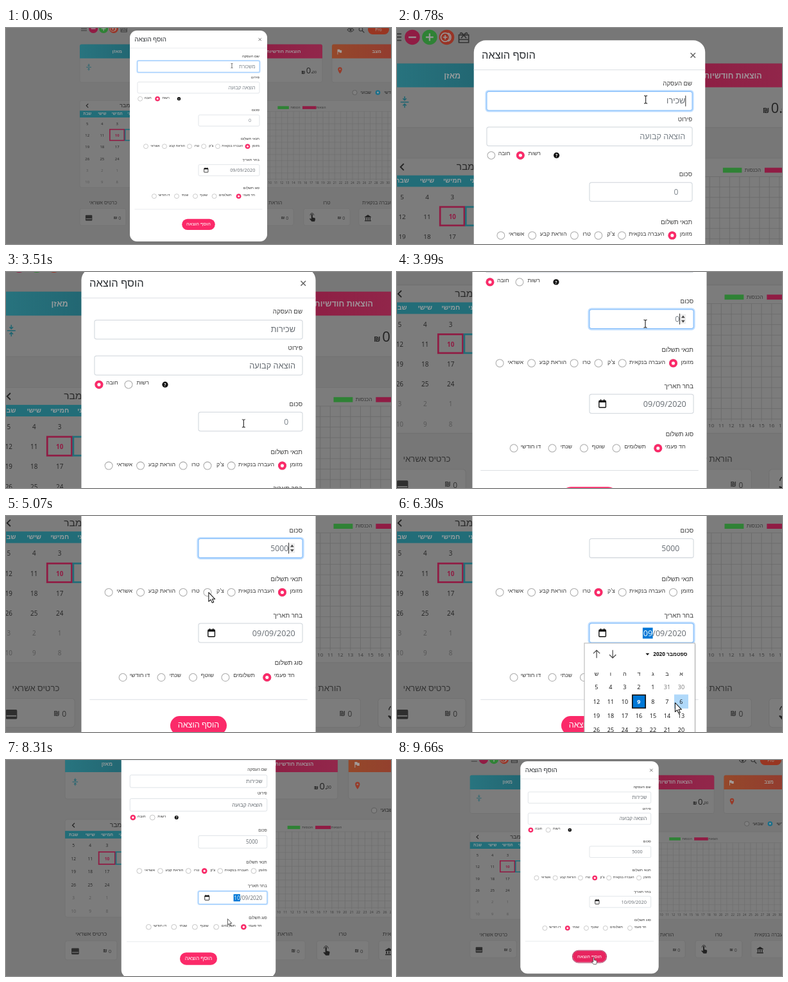
Animation of 600 by 338 pixels, one loop 9690 ms. Source, as an HTML page:

```html
<!DOCTYPE html>
<html lang="he">
<head>
<meta charset="utf-8">
<title>הוסף הוצאה</title>
<style>
html, body { margin: 0; width: 100%; height: 100%; overflow: hidden; background: #777; }
svg { display: block; width: 100vw; height: 100vh; }
text { font-family: 'Open Sans', 'Noto Sans', 'Liberation Sans', sans-serif; white-space: pre; }
</style>
</head>
<body>
<svg id="stage" viewBox="0 0 600 338" preserveAspectRatio="none"></svg>
<script>
const LOOP = 9690;
const PINK = '#fb2a69', DIM_PINK = '#901c44', DIM_GREEN = '#2f8235', TEAL = '#226d78';
const INK = '#3a3a3a', GREY = '#666c72', PALE = '#7b838a';
const stage = document.getElementById('stage');
const $ = id => document.getElementById(id);

// ---- markup helpers (y of a text is its visual middle) ----
const attrs = o => Object.entries(o).map(([k, v]) => ` ${k}="${v}"`).join('');
const tag = (name, o, inner = '') => `<${name}${attrs(o)}>${inner}</${name}>`;
const rect = (x, y, width, height, fill, o = {}) => tag('rect', { x, y, width, height, fill, ...o });
const circle = (cx, cy, r, fill, o = {}) => tag('circle', { cx, cy, r, fill, ...o });
const path = (d, stroke, w = 1, o = {}) => tag('path', { d, fill: 'none', stroke, 'stroke-width': w, ...o });
const text = (x, y, s, size, fill = INK, anchor = 'end', o = {}) =>
  tag('text', { x, y: (y + size * (/\d/.test(s) ? .36 : .29)).toFixed(2), 'font-size': size, fill, 'text-anchor': anchor, ...o }, s);
const group = (id, inner, o = {}) => tag('g', { id, ...o }, inner);
const bold = { 'font-weight': 700 }, semi = { 'font-weight': 600 }, medium = { 'font-weight': 500 };

// ---- dimmed page behind the dialog ----
function card(x, y, w, h) {
  return rect(x, y, w, h, '#7c7c7c', { rx: 3, stroke: '#717171', 'stroke-width': .6 });
}
function topCard(x, w, fill) {
  return card(x, 25.5, w, 59.5) + tag('path', { d: `M${x} 47.6v-19.3q0-2.8 2.8-2.8h${w - 5.6}q2.8 0 2.8 2.8v19.3z`, fill });
}
function gradient(id, a, b) {
  return tag('linearGradient', { id }, `<stop stop-color="${a}"/><stop offset="1" stop-color="${b}"/>`);
}
function page() {
  let s = tag('defs', {}, gradient('teal', '#28747f', '#1f5f6b') + gradient('pink', '#8c1c42', '#92274b') + gradient('orange', '#94482a', '#923831'));
  s += rect(-200, -200, 1000, 800, '#777');
  // toolbar
  s += path('M117 -2h9M117 1h9M117 4h9', '#3a3a3a', 1.1);
  s += circle(136.1, 1.1, 7, DIM_PINK) + path('M132.6 1.1h7', '#999', 1.3);
  s += circle(152.1, 1.1, 7, DIM_GREEN) + path('M148.6 1.1h7M152.1 -2.4v7', '#999', 1.3);
  s += circle(167.9, 1.1, 7, '#983426') + circle(166.5, 1.1, 4, 'none', { stroke: '#999', 'stroke-width': .9 }) +
    path('M169 -2.7a4 4 0 0 1 0 7.6M164.5 1.1h4M166.5 -.9v4', '#999', .9);
  s += path('M179.2 -1h9v7h-9zM179.2 3.2h9M183.7 -1l-2.4 3M183.7 -1l2.4 3M183.7 -1q-3-3.5-3.4-.8M183.7 -1q3-3.5 3.4-.8', '#333', 1);
  s += path('M532 3q5-6 10 0q-5 6-10 0z', '#333', 1) + circle(537, 3, 1.7, '#333');
  s += circle(553, 2, 2.8, 'none', { stroke: '#333', 'stroke-width': 1 }) + path('M555 4l3.4 3.4', '#333', 1.2);
  s += rect(564, -5, 33, 15, '#983622', { rx: 7.5 }) + text(580.5, 2.6, 'Pro', 6.6, '#a0a0a0', 'middle');
  // summary cards
  s += topCard(115, 125, 'url(#teal)') + topCard(368, 125, 'url(#pink)') + topCard(508, 125, 'url(#orange)');
  s += text(180.8, 37, 'מאזן', 7.4, '#959b9c', 'end', bold) + text(459.5, 37, 'הוצאות חודשיות', 7.4, '#a0949a', 'end', bold) +
    text(585, 37, 'מצב', 7.4, '#a39a96', 'end', bold);
  s += path('M125.2 61.3h7.6M129 56v3.4M129 66.600v-3.4M127.4 58l1.6 1.6 1.6-1.6M127.4 64.600l1.6-1.6 1.6 1.6', '#1f6470', .9);
  s += text(463.2, 69.8, '₪', 6.5, '#222', 'middle', bold) + text(467.8, 66.6, '0.', 13, '#222', 'start') +
    text(477.6, 68.5, '00', 5.6, '#222', 'start');
  s += tag('path', { d: 'M520.5 71.5c-5-6-3.6-10.2 0-10.2s5 4.2 0 10.2z', fill: '#983a28' }) + circle(520.5, 64.7, 1.2, '#7c7c7c');
  s += tag('path', { d: 'M516.5 33.5h3.5l.6 1.2h2.6v4h-3.2l-.6-1.2h-2v4h-.9z', fill: '#a39a96' });
  // month grid
  s += card(115, 113.5, 125, 136);
  s += path('M128.2 118.6l-3 3 3 3', '#222', 1.1) + text(177, 121.8, 'ספטמבר', 9.1, '#2a2a2a', 'start');
  s += rect(115, 129.4, 125, 10.6, TEAL);
  const cols = [126.7, 149.8, 173.2, 196.6];
  ['שבת', 'שישי', 'חמישי', 'רביעי'].forEach((d, i) => s += text(cols[i], 134.6, d, 6, '#979d9e', 'middle', semi));
  for (let r = 0; r < 6; r++) for (let c = 0; c < 4; c++) {
    const n = 5 - c + r * 7, day = n > 30 ? n - 30 : n, hot = n === 10;
    s += text(cols[c], 149.6 + r * 18.3, String(day), 5.8, hot ? DIM_PINK : n > 30 ? '#555' : '#222', 'middle', hot ? bold : {});
  }
  s += rect(161.8, 158.7, 22.4, 17.2, 'none', { stroke: DIM_PINK, 'stroke-width': 1.6 });
  s += rect(185.6, 158.7, 22.4, 17.2, 'none', { stroke: TEAL, 'stroke-width': 1.6 });
  // chart
  s += circle(543.5, 101, 3.6, '#7f7f7f', { stroke: '#555', 'stroke-width': .7 }) + text(569, 101, 'שבועי', 6.8, '#252525');
  s += circle(579.5, 101, 3.8, '#1a6f8a') + circle(579.5, 101, 1.4, '#999') + text(606, 101, 'חודשי', 6.8, '#252525');
  s += card(368, 113.5, 300, 136);
  s += rect(423.4, 122.3, 17.5, 4.6, DIM_GREEN) + text(458.6, 124.5, 'הכנסות', 4.8, '#383838');
  s += rect(462, 122.3, 21.5, 4.6, DIM_PINK) + text(498.5, 124.5, 'הוצאות', 4.8, '#383838');
  let grid = '';
  for (let i = -2; i < 23; i++) grid += `M${(411.2 + i * 9.2).toFixed(1)} 130.6v108`;
  for (let i = 0; i < 12; i++) grid += `M395 ${(130.6 + i * 9.62).toFixed(1)}h220`;
  s += path(grid, '#6b6b6b', .5);
  for (let i = 0; i < 22; i++) s += text(411.2 + i * 9.2, 242.2, String(10 + i), 4.7, '#383838', 'middle');
  // payment cards
  const pay = [[115, 173, 'כרטיס אשראי'], [376, 430.5, 'הוראת קבע'], [464, 505.5, 'טרו'], [550, 604, 'העברה בנקאית']];
  pay.forEach(([x, right, name]) => {
    s += card(x, 282.5, 72, 26.5) + text(right, 273.6, name, 7.7, '#333');
    s += text(x + 55.5, 297, '₪', 6, '#333', 'middle', semi) + text(x + 64.3, 297, '0', 7, '#333');
  });
  s += rect(123.9, 292.8, 10.4, 8.6, '#2e2e2e', { rx: 1 }) + rect(124.6, 298, 9, 1.1, '#747474');
  s += tag('path', { d: 'M475.8 291.5q1.2-1 2 0v5l4 1q.6 2-.8 5.2h-4.5l-3.5-4 .8-.7 2 .8z', fill: '#222' }) +
    path('M473.9 293.2q.6-3.6 3-3.6t3 3.6', '#222', .8);
  s += tag('path', { d: 'M559 295.5l5-3.2 5 3.2v1h-10zM559 301h10v1.3h-10zM560 297.2h1.5v3.2h-1.5zM563.3 297.2h1.5v3.2h-1.5zM566.5 297.2h1.5v3.2h-1.5z', fill: '#222' });
  return s;
}

// ---- dialog ----
const radioSets = {
  need: { y: 110.8, ty: 109.2, items: [[236.1, 254.9, 'רשות'], [209.1, 226.7, 'חובה']] },
  pay: { y: 185.2, ty: 184.2, items: [[376.5, 395, 'מזומן'], [330, 369.2, 'העברה בנקאית'], [308.2, 323.4, "צ'ק"],
    [286, 301.1, 'טרו'], [247, 278.9, 'הוראת קבע'], [218, 239.6, 'אשראי']] },
  kind: { y: 263.2, ty: 261.6, items: [[362.6, 387.8, 'חד פעמי'], [324.6, 351.5, 'תשלומים'], [295, 314, 'שוטף'],
    [266, 284.2, 'שנתי'], [230.9, 255.5, 'דו חודשי']] }
};
const fields = { name: [205, 51.6], info: [205, 84.5], sum: [300, 136], date: [300, 213.7] };

function radios(key) {
  const set = radioSets[key];
  return set.items.map(([x, right, s]) => circle(x, set.y, 3.5, '#fff', { stroke: '#a9a9a9', 'stroke-width': .6 }) +
    text(right, set.ty, s, 5.2)).join('') +
    group(key, circle(0, set.y, 3.8, PINK) + circle(0, set.y, 1.5, '#fff'));
}
function field(key) {
  const [x, y] = fields[key], w = 395 - x;
  return group(key + 'Ring', rect(x - .7, y - .7, w + 1.4, 18.9, 'none', { rx: 2.4, stroke: '#bfdeff', 'stroke-width': 1.6 })) +
    rect(x, y, w, 17.5, '#fff', { id: key + 'Box', rx: 1.9, 'stroke-width': .6 });
}
function popup() {
  let s = rect(295.3, 231.8, 101, 124, '#000', { opacity: .12, transform: 'translate(.9 .9)' }) +
    rect(295.3, 231.8, 101, 124, '#fff', { stroke: '#b5b5b5', 'stroke-width': .6 });
  s += text(389.4, 241.8, 'ספטמבר 2020', 4.8, '#111', 'end', bold) + tag('path', { d: 'M351.3 241h3.4l-1.7 2z', fill: '#111' });
  s += path('M306.5 245.5v-7M303.5 241.3l3-3 3 3M321.2 238.2v7M318.2 242.4l3 3 3-3', '#444', .7);
  s += rect(0, 278.9, 12.9, 12.9, '#b0d9fa', { id: 'hover' });
  s += rect(339.2, 279.4, 11.9, 11.9, '#0078d7', { stroke: '#111', 'stroke-width': 1 });
  const x = i => 383.8 - 12.9 * i;
  [...'אבגדהוש'].forEach((d, i) => s += text(x(i), 260, d, 5.2, '#222', 'middle'));
  for (let n = 0; n < 42; n++) {
    const d = n - 1, out = d < 1 || d > 30, day = d < 1 ? d + 31 : d > 30 ? d - 30 : d;
    s += text(x(n % 7), 272.4 + 12.94 * Math.floor(n / 7), String(day), 5.3, d === 9 ? '#fff' : out ? '#777' : '#111', 'middle', d === 9 ? bold : {});
  }
  return s;
}
function dialog() {
  let s = rect(193, 4, 214, 330, '#fff', { rx: 11 });
  s += path('M193 31.4h214M200.5 283.6h199', '#dcdfe3', .6);
  s += text(250, 18.4, 'הוסף הוצאה', 9.7, '#2b2f33', 'end', medium) + path('M393.5 15.7l4.4 4.4M397.9 15.7l-4.4 4.4', '#666', .9);
  [[44.1, 'שם העסקה'], [77.4, 'פירוט'], [128.8, 'סכום'], [173.1, 'תנאי תשלום'], [206.5, 'בחר תאריך'], [250.4, 'סוג תשלום']]
    .forEach(([y, t]) => s += text(395, y, t, 5.7));
  s += Object.keys(fields).map(field).join('') + Object.keys(radioSets).map(radios).join('');
  s += circle(269.5, 110.8, 2.7, '#111') + text(269.5, 111.4, '?', 4, '#fff', 'middle', bold);
  s += text(388.6, 60.6, '', 7.5, GREY, 'end', { id: 'nameText' }) + text(388.6, 93.6, '', 7.5, GREY, 'end', { id: 'infoText' });
  s += text(382.2, 144.8, '0', 7.2, GREY, 'end', { id: 'sumText' });
  s += group('spin', rect(383, 140.2, 5, 9, '#eee') + tag('path', { d: 'M383.8 143.6l1.7-2.2 1.7 2.2zM383.8 145.8l1.7 2.2 1.7-2.2z', fill: '#444' }));
  s += rect(348.6, 217.6, 9.2, 10, '#0078d7', { id: 'mark' });
  s += text(388.4, 222.6, '0', 7.4, GREY, 'end', { id: 'dateText' });
  s += rect(308.7, 219.8, 6.2, 6, 'none', { rx: .5, stroke: '#111', 'stroke-width': .8 }) +
    rect(308.7, 219.2, 6.2, 2, '#111') + path('M310.3 218.3v1.5M313.3 218.3v1.5', '#111', .8);
  s += rect(0, 0, .6, 10, '#333', { id: 'caret' });
  s += rect(273.6, 298, 52.8, 19, '#fff', { id: 'btnRing', rx: 9.5, stroke: '#b3476f', 'stroke-width': 1.2 });
  s += rect(274.2, 298.7, 51.6, 17.3, PINK, { id: 'btn', rx: 8.65 }) + text(300, 307.2, 'הוסף הוצאה', 7.4, '#fff', 'middle', medium);
  s += group('popup', popup());
  return s;
}
const pointer =
  group('arrow', tag('path', { d: 'M0 0v8.3l1.9-1.7 1.3 2.9 1.4-.6-1.3-2.8h2.5z', fill: '#fff', stroke: '#111', 'stroke-width': .6, 'stroke-linejoin': 'round' })) +
  group('beam', path('M-1.5-3.6q1.5 0 1.5.8v5.6q0 .8-1.5.8M1.5-3.6q-1.5 0-1.5.8M0 2.8q0 .8 1.5.8', '#333', .7)) +
  group('hand', tag('path', { d: 'M-.8 0q.8-1 1.6 0v3.6q3.8.3 4 1.8v2.4l-1 2.4h-4l-3-4q.2-1.2 2.4.4z', fill: '#fff', stroke: '#111', 'stroke-width': .6, 'stroke-linejoin': 'round' }));
stage.innerHTML = group('cam', page() + dialog() + group('pointer', pointer));

// ---- timeline ----
const quad = p => p < .5 ? 2 * p * p : 1 - 2 * (1 - p) * (1 - p);
const ease = (t, a, b) => quad(Math.min(1, Math.max(0, (t - a) / (b - a))));
const show = (id, on) => $(id).setAttribute('display', on ? 'inline' : 'none');
const set = (id, o) => { for (const k in o) $(id).setAttribute(k, o[k]); };
// number of keys pressed so far
const typed = (t, times) => times.filter(x => t >= x).length;

const moves = [[0, 352, 59], [1170, 352, 59], [1350, 374, 90], [1590, 388, 107.3], [2610, 388, 107.3], [3000, 209, 111], [3120, 209, 111],
  [3600, 351, 149], [4800, 351, 149], [5100, 308.5, 186], [5220, 308.5, 186], [5520, 313, 223], [5800, 322, 224], [6240, 378.2, 286.5],
  [6450, 378.2, 286.5], [6780, 340, 288], [7050, 332, 287], [7350, 332, 287], [7740, 364.1, 248.4], [8040, 364.1, 248.4],
  [8820, 266, 263], [9540, 266, 263], [9660, 306.5, 309.3], [LOOP, 306.5, 309.3]];
function pointerAt(t) {
  const i = Math.max(1, moves.findIndex(m => m[0] > t)), [a, ax, ay] = moves[i - 1], [b, bx, by] = moves[i];
  const p = ease(t, a, b);
  return [ax + (bx - ax) * p, ay + (by - ay) * p];
}

function draw(t) {
  const zoom = ease(t, 0, 890), pan = ease(t, 3280, 4210), out = ease(t, 7650, 8580);
  let s = 1 + .706 * zoom, y = 13 * zoom - 209.5 * pan;
  s += (1.007 - s) * out;
  y += (-2 - y) * out;
  set('cam', { transform: `translate(${300 - 300 * s} ${y}) scale(${s})` });

  const focus = t < 1350 ? 'name' : t < 3030 ? 'info' : t < 3570 ? '' : t < 5130 ? 'sum' : t < 5550 ? '' : t < 8880 ? 'date' : '';
  for (const k in fields) {
    show(k + 'Ring', k === focus);
    set(k + 'Box', { stroke: k === focus ? '#7db9fa' : '#ced4da' });
  }
  const n = typed(t, [180, 330, 480, 600, 720, 870]);
  $('nameText').textContent = n ? 'שכירות'.slice(0, n) : 'משכורת';
  set('nameText', { fill: n ? GREY : PALE });
  const m = typed(t, [1740, 1740, 1740, 1800, 1800, 1800, 1890, 1890, 2070, 2190, 2340]);
  $('infoText').textContent = t < 1590 ? 'הוצאה קבועה' : 'הוצאה קבועה'.slice(0, m);
  set('infoText', { fill: t < 1590 ? PALE : GREY });
  const k = typed(t, [4200, 4290, 4380, 4530]);
  $('sumText').textContent = k ? '5000'.slice(0, k) : '0';
  set('sumText', { fill: k ? GREY : PALE });
  show('spin', focus === 'sum');

  const picked = t >= 7350, day = picked ? '10' : '09', sel = focus === 'date' ? '#fff' : GREY;
  $('dateText').innerHTML = `<tspan fill="${sel}">${day}</tspan>/09/2020`;
  show('mark', focus === 'date');
  show('popup', focus === 'date' && !picked);

  const pick = { need: t >= 3030 ? 1 : 0, pay: t >= 5130 ? 2 : 0, kind: t >= 8880 ? 3 : 0 };
  for (const key in pick) set(key, { transform: `translate(${radioSets[key].items[pick[key]][0]} 0)` });

  const caretOn = focus === 'name' ? t > 100 && t < 1050 : focus === 'info' ? t < 1590 || t >= 1740 : focus === 'sum';
  show('caret', caretOn);
  if (caretOn) set('caret', { x: focus === 'sum' ? 382.1 : 388.6, y: fields[focus][1] + 3.7 });

  const [px, py] = pointerAt(t);
  set('pointer', { transform: `translate(${px} ${py})` });
  const over = Object.values(fields).slice(0, 3).some(([fx, fy]) => px > fx && px < 395 && py > fy && py < fy + 17.5);
  const onBtn = t > 9000 && py > 298;
  show('beam', over);
  show('hand', onBtn);
  show('arrow', !over && !onBtn);
  const col = Math.round((383.8 - px) / 12.9), hover = py > 278.9 && py < 291.8 && col >= 0 && col < 7;
  show('hover', hover);
  if (hover) set('hover', { x: 383.8 - col * 12.9 - 6.45 });
  show('btnRing', onBtn);
  set('btn', { fill: onBtn ? '#e8245f' : PINK });
}

const start = performance.now();
function tick() {
  draw((performance.now() - start) % LOOP);
  requestAnimationFrame(tick);
}
draw(0);
requestAnimationFrame(tick);
</script>
</body>
</html>
```
